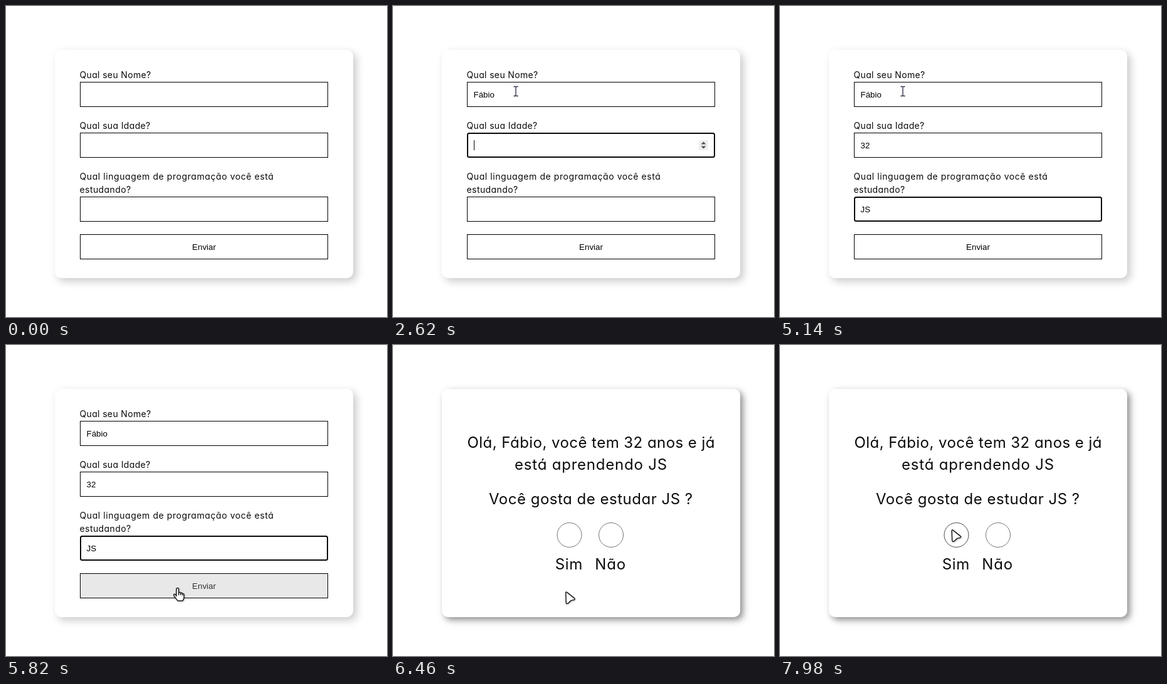
Animation of 608 by 496 pixels, one loop 8 s. Source, as an HTML page:

```html
<!DOCTYPE html>
<html lang="pt-BR">
<head>
<meta charset="utf-8">
<title>Formulário</title>
<style>
  html, body { margin: 0; width: 100%; height: 100%; overflow: hidden; background: #fff; }
  svg { display: block; width: 100%; height: 100%; }
  .copy { font-family: Inter, "Open Sans", sans-serif; font-feature-settings: "cv11"; fill: #0a0a0a; white-space: pre; }
  .label { font-size: 14px; }
  .big { font-size: 24px; }
  .ui { font: 13.333px "Liberation Sans", Arial, sans-serif; fill: #000; }
  .card { fill: #fff; }
  .soft { filter: drop-shadow(5px 5px 6.5px rgba(0, 0, 0, .21)); }
  .deep { filter: drop-shadow(4px 4px 4px rgba(0, 0, 0, .28)); }
  .box { fill: #fff; stroke: #000; }
  .ring { fill: #fff; stroke: #0a0a0a; stroke-width: 2; }
  .radio { fill: #fff; stroke: #767676; }
  .pointer {
    fill: #fff; stroke: #1a1a1a; stroke-width: 1.5; stroke-linejoin: round; stroke-linecap: round;
    filter: drop-shadow(1px 1px 1px rgba(0, 0, 0, .25));
  }
</style>
</head>
<body>
<svg id="stage" viewBox="0 0 608 496" xmlns="http://www.w3.org/2000/svg"></svg>
<script>
const LOOP = 8000;
const SENT = 6140;
const NAME = "Fábio";
const stage = document.getElementById("stage");

function add(parent, tag, attrs = {}, text) {
  const el = document.createElementNS("http://www.w3.org/2000/svg", tag);
  for (const key in attrs) el.setAttribute(key, attrs[key]);
  if (text !== undefined) el.textContent = text;
  parent.appendChild(el);
  return el;
}

const show = (el, on) => el.setAttribute("visibility", on ? "inherit" : "hidden");

function copy(parent, size, x, y, spacing, text) {
  add(parent, "text", { class: "copy " + size, x, y, style: `letter-spacing:${spacing}em` }, text);
}

function card(parent, shadow) {
  add(parent, "rect", { class: "card " + shadow, x: 78, y: 70, width: 476, height: 364, rx: 10 });
}

card(stage, "soft");

// Form view
const form = add(stage, "g");
copy(form, "label", 117.5, 115, .025, "Qual seu Nome?");
copy(form, "label", 117.5, 196, .025, "Qual sua Idade?");
copy(form, "label", 117.5, 277, .041, "Qual linguagem de programação você está");
copy(form, "label", 117.5, 298, .03, "estudando?");

const frame = y => add(form, "rect", { class: "box", x: 118.5, y: y + .5, width: 395, height: 39 });

function makeField(y, text, focus, blur, keys) {
  return {
    y, text, focus, blur, keys,
    box: frame(y),
    ring: add(form, "rect", { class: "ring", x: 119, y: y + 1, width: 394, height: 38, rx: 2.5 }),
    value: add(form, "text", { class: "ui", x: 128.5, y: y + 25 }),
    caret: add(form, "rect", { y: y + 12, width: 1, height: 16 })
  };
}

const fields = [
  makeField(121, NAME, 1020, 2250, [1320, 1450, 1570, 1700, 1840]),
  makeField(202, "32", 2250, 3400, [2880, 3040]),
  makeField(304, "JS", 3400, SENT, [4150, 4300])
];
const age = fields[1];

const spinner = add(form, "g");
add(spinner, "rect", { x: 488, y: 214, width: 15, height: 16, fill: "#efefef" });
add(spinner, "path", { d: "M491.5 220.5h8l-4-4zM491.5 223.5h8l-4 4z", fill: "#505050" });

const button = frame(364);
const send = add(form, "text", { class: "ui", x: 316, y: 389, "text-anchor": "middle" }, "Enviar");

// Answer view
const answer = add(stage, "g");
card(answer, "deep");
copy(answer, "big", 118.5, 164, .019, `Olá, ${NAME}, você tem 32 anos e já`);
copy(answer, "big", 194, 199, .033, "está aprendendo JS");
copy(answer, "big", 153, 254, .021, "Você gosta de estudar JS ?");
const yes = add(answer, "circle", { class: "radio", cx: 281.5, cy: 303, r: 19.5 });
add(answer, "circle", { class: "radio", cx: 348, cy: 303, r: 19.5 });
copy(answer, "big", 258.7, 358, .03, "Sim");
copy(answer, "big", 322.3, 358, .035, "Não");

// Mouse pointers, drawn around their hot spot
const mouse = add(stage, "g");
const pointers = {
  arrow: add(mouse, "path", {
    class: "pointer",
    d: "M1.2 2Q1.6 .4 3 1.3L15.2 11.2Q16.2 12.6 14.6 13.2L9.5 14.6L4.6 19.2Q2.2 20.4 1.7 17.8Z"
  }),
  beam: add(mouse, "path", {
    d: "M-3.5 -7.5H-1.2L0 -6.8L1.2 -7.5H3.5M0 -6.8V6.8M-3.5 7.5H-1.2L0 6.8L1.2 7.5H3.5",
    fill: "none", stroke: "#25253f", "stroke-width": 1.3
  }),
  hand: add(mouse, "path", {
    class: "pointer",
    d: "M-1.2 12.5V1.6Q-1 -.4 .8 -.4Q2.5 -.4 2.6 1.6V7.2Q4.6 5.8 5.8 7.6Q7.6 6.6 8.6 8.5Q11 8 11 10.4V14.8"
      + "Q10.8 18.2 8.8 20H1.2Q-.6 18.2 -2.4 15.6L-5.2 11.6Q-5.8 9.6 -4 9.3Q-2.4 9.6 -1.2 12.5ZM2.6 7.2V10.5M5.8 7.6V10.5M8.6 8.5V11"
  })
};

// time, x, y
const path = [
  [380, 612, 300], [800, 196, 136], [5350, 196, 136], [5780, 273, 388],
  [6140, 273, 388], [6300, 274.5, 393], [6520, 274.5, 393], [6880, 273, 294]
];

function mouseAt(t) {
  const next = path.findIndex(p => p[0] > t);
  if (next < 0) return path[path.length - 1].slice(1);
  if (next === 0) return path[0].slice(1);
  const [t0, x0, y0] = path[next - 1], [t1, x1, y1] = path[next];
  const u = (t - t0) / (t1 - t0), k = u * u * (3 - 2 * u);
  return [x0 + (x1 - x0) * k, y0 + (y1 - y0) * k];
}

const over = (x, y, top) => x >= 118 && x < 514 && y >= top && y < top + 40;
const hasFocus = (f, t) => t >= f.focus && t < f.blur;

function drawField(f, t) {
  const typed = f.keys.filter(k => k <= t);
  const focused = hasFocus(f, t);
  f.value.textContent = f.text.slice(0, typed.length);
  show(f.box, !focused);
  show(f.ring, focused);
  const since = t - Math.max(f.focus, ...typed);
  show(f.caret, focused && since % 1000 < 500);
  const width = typed.length ? f.value.getComputedTextLength() : 0;
  f.caret.setAttribute("x", Math.round(129 + width));
}

function draw(t) {
  const sent = t >= SENT;
  const [x, y] = mouseAt(t);
  show(form, !sent);
  show(answer, sent);
  fields.forEach(f => drawField(f, t));
  show(spinner, hasFocus(age, t) || over(x, y, age.y));

  const onButton = !sent && over(x, y, 364);
  const onField = !sent && fields.some(f => over(x, y, f.y));
  button.style.fill = onButton ? "#e8e8e8" : "#fff";
  send.style.fill = onButton ? "#333" : "#000";
  yes.style.stroke = Math.hypot(x - 281.5, y - 303) < 20 ? "#4a4a4a" : "#767676";

  const kind = onButton ? "hand" : onField ? "beam" : "arrow";
  for (const name in pointers) show(pointers[name], name === kind);
  show(mouse, t >= path[0][0]);
  mouse.setAttribute("transform", `translate(${x.toFixed(2)} ${y.toFixed(2)})`);
}

const start = performance.now();
function tick() {
  draw((performance.now() - start) % LOOP);
  requestAnimationFrame(tick);
}
tick();
</script>
</body>
</html>
```
